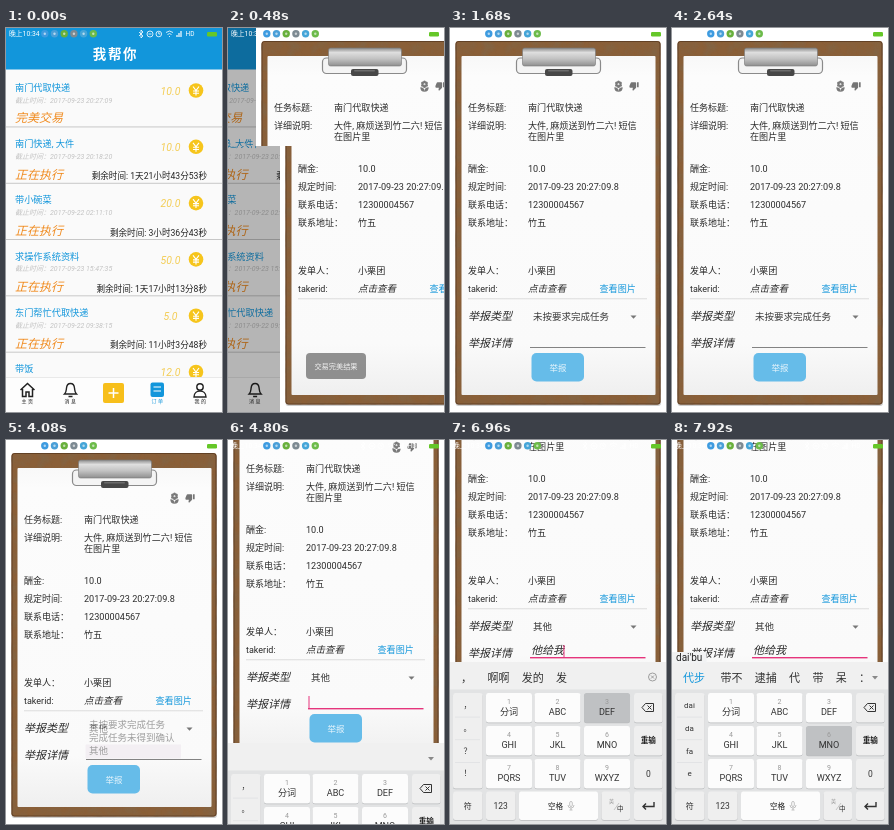
These frames come from a looping animation (216x384 px, 8000 ms). An HTML page:

```html
<!DOCTYPE html>
<html lang="zh-CN">
<head>
<meta charset="utf-8">
<style>
html, body { margin: 0; width: 100%; height: 100%; overflow: hidden; background: #fff; }
svg { display: block; width: 100%; height: 100%; }
text { font-family: Roboto, "Noto Sans CJK SC", "Noto Sans CJK", sans-serif; white-space: pre; }
.it { font-style: italic; }
.mid { text-anchor: middle; }
.end { text-anchor: end; }
</style>
</head>
<body>
<svg id="stage" viewBox="0 0 216 384" preserveAspectRatio="none"></svg>
<script>
const STEP = 240, LOOP = 8000, BLUE = '#1296db', INK = '#2b2b2b';
const PAN = 102, KB_TOP = 222, TEAR = 118;

// Markup helpers; text is placed by its vertical centre.
const text = (x, y, s, size = 9, fill = INK, cls = '', more = '') =>
  `<text x="${x}" y="${y + size * .36}" font-size="${size}" fill="${fill}" class="${cls}" ${more}>${s}</text>`;
const rect = (x, y, w, h, fill, r = 0, more = '') =>
  `<rect x="${x}" y="${y}" width="${w}" height="${h}" fill="${fill}" rx="${r}" ${more}/>`;
const path = (d, stroke, w = 1, fill = 'none', more = '') =>
  `<path d="${d}" stroke="${stroke}" stroke-width="${w}" fill="${fill}" ${more}/>`;
const dot = (x, y, r, fill, more = '') => `<circle cx="${x}" cy="${y}" r="${r}" fill="${fill}" ${more}/>`;
const group = (id, body, more = '') => `<g id="${id}" ${more}>${body}</g>`;

const defs = () => `
  <linearGradient id="paper" x1="0" y1="0" x2="0" y2="1">
    <stop offset="0" stop-color="#f8f8f8"/><stop offset=".06" stop-color="#fcfcfc"/>
    <stop offset=".85" stop-color="#fafafa"/><stop offset="1" stop-color="#efefef"/>
  </linearGradient>
  <linearGradient id="metal" x1="0" y1="0" x2="0" y2="1">
    <stop offset="0" stop-color="#8c8c8c"/><stop offset=".25" stop-color="#dedede"/>
    <stop offset=".6" stop-color="#c2c2c2"/><stop offset="1" stop-color="#8f8f8f"/>
  </linearGradient>
  <filter id="grain" x="0" y="0" width="1" height="1">
    <feTurbulence type="fractalNoise" baseFrequency=".09" numOctaves="3" seed="4"/>
    <feColorMatrix values="0 0 0 0 .22  0 0 0 0 .13  0 0 0 0 .06  1.8 0 0 0 -.65"/>
    <feComposite in2="SourceGraphic" operator="in" result="spots"/>
    <feMerge><feMergeNode in="SourceGraphic"/><feMergeNode in="spots"/></feMerge>
  </filter>
  <clipPath id="upper"><rect width="216" height="${TEAR}"/></clipPath>
  <clipPath id="lower"><rect y="${TEAR}" width="216" height="${384 - TEAR}"/></clipPath>`;

const orders = [
  ['南门代取快递', '10.0', '23 20:27:09', ''],
  ['南门快递, 大件', '10.0', '23 20:18:20', '1天21小时43分53秒'],
  ['带小碗菜', '20.0', '22 02:11:10', '3小时36分43秒'],
  ['求操作系统资料', '50.0', '23 15:47:35', '1天17小时13分8秒'],
  ['东门帮忙代取快递', '5.0', '22 09:38:15', '11小时3分48秒'],
  ['带饭', '12.0', '22 11:20:00', '10小时8分5秒'],
];

function order([title, price, time, left], i) {
  const y = 42.5 + i * 56.3;
  return text(9, y + 17, title, 9.2, BLUE)
    + text(9, y + 29.5, '截止时间：2017-09-' + time, 7, '#c3c3c3', 'it')
    + text(9, y + 47.5, left ? '正在执行' : '完美交易', 12, '#f08a1d', 'it')
    + (left && text(201, y + 49.5, '剩余时间: ' + left, 8.6, '#222', 'end'))
    + text(164.5, y + 20.5, price, 10.5, '#f3cd55', 'it mid')
    + dot(190, y + 20, 7.3, '#f6c51c')
    + path(`M187 ${y + 16}l3 4l3-4M190 ${y + 20}v5M187 ${y + 20.5}h6M187 ${y + 22.7}h6`, '#fff', 1.1)
    + rect(0, y + 56, 216, .9, '#c2c2c2');
}

function navBar() {
  const label = (x, s, c) => text(x, 373.5, s, 5, c, 'mid', 'letter-spacing="1.5"');
  return rect(0, 349, 216, 35, '#fdfdfd') + rect(0, 349, 216, .6, '#ddd')
    + path('M14.5 362l7-6.5l7 6.5M16.5 361v7.5h3.5v-4.5h3v4.5h3.5v-7.5', '#222', 1.5)
    + path('M58.5 366c2-2 1.7-4 2-6c.5-6 7.5-6 8 0c.3 2 0 4 2 6zM62.5 368.5h4', '#222', 1.4)
    + rect(97, 355, 21, 20, '#f7bf1b', 2) + path('M107.5 360v10M102.5 365h10', '#fff', 1.5)
    + rect(144.5, 354.5, 13.5, 14.5, BLUE, 2) + path('M147.5 359h7.5M147.5 363h7.5', '#fff', 1.2)
    + path('M188 369c0-8 12-8 12 0z', '#222', 1.4) + dot(194, 359, 3.2, '#fff', 'stroke="#222" stroke-width="1.4"')
    + label(22, '主页', '#222') + label(65, '消息', '#222') + label(152, '订单', BLUE) + label(195, '我的', '#222');
}

const listPage = () => rect(0, 0, 216, 384, '#fafafa')
  + rect(0, 42, 216, 56, '#dcdcdc', 0, 'id="pressed"')
  + orders.map(order).join('')
  + rect(0, 0, 216, 41.5, BLUE)
  + text(109.5, 26.5, '我帮你', 13.5, '#fff', 'mid', 'font-weight="700" letter-spacing="1.6"')
  + navBar();

const clipboard = () => rect(0, 0, 216, 384, '#fff')
  + rect(5.5, 14, 205.5, 364, '#000', 3, 'opacity=".2"')
  + rect(5.5, 13, 205, 363.5, '#8a5f39', 3, 'filter="url(#grain)"')
  + rect(6, 13.5, 204, 362.5, 'none', 2.5, 'stroke="#4a2d18" opacity=".6"')
  + rect(11.5, 28, 194, 339, 'url(#paper)', 1)
  + rect(66.5, 30, 84, 15.5, '#f4f4f4', 4, 'stroke="#8a8a8a" stroke-width="1.2"')
  + rect(72.5, 20, 73, 18, 'url(#metal)', 2, 'stroke="#777" stroke-width=".6"')
  + rect(95, 41, 27.5, 7, '#474747', 2) + rect(98, 42, 21, 1.5, '#6c6c6c', .7);

const thumbDown = 'M15 3H6c-.8 0-1.5.5-1.8 1.2l-3 7c-.1.3-.2.5-.2.8v2c0 1.1.9 2 2 2h6.3l-1 4.6c0 .5.1 1 .4 1.4L9.8 23l6.6-6.6c.4-.4.6-.9.6-1.4V5c0-1.1-.9-2-2-2zm4 0v12h4V3z';

function icons() {
  const petals = [0, 1, 2, 3, 4, 5].map(i => dot(168.5 + 2.2 * Math.sin(i * 1.047), 56.2 - 2.2 * Math.cos(i * 1.047), 1.5, '#7a7a7a'));
  return petals.join('') + dot(168.5, 56.2, .9, '#ddd')
    + path('M164.3 59.2q4.2 0 4.2 4q0-4 4.2-4q0 4.6-4.2 4.6q-4.2 0-4.2-4.6z', 'none', 0, '#7a7a7a')
    + path(thumbDown, 'none', 0, '#757575', 'transform="translate(179 53) scale(.42)"');
}

const details = [
  [80, '任务标题:', '南门代取快递'], [98, '详细说明:', '大件, 麻烦送到竹二六! 短信'], [109, '', '在图片里'],
  [140.5, '酬金:', '10.0'], [158.5, '规定时间:', '2017-09-23 20:27:09.8'], [176.5, '联系电话：', '12300004567'],
  [194.5, '联系地址：', '竹五'], [242.5, '发单人：', '小栗团'],
];
const choices = ['未按要求完成任务', '完成任务未得到确认', '其他'];

const form = () => text(18, 288.5, '举报类型', 11, INK, 'it') + text(18, 315, '举报详情', 11, INK, 'it')
  + text(83, 289, '', 9.5, '#3a3a3a', '', 'id="choice"')
  + path('M180.5 287.5h6l-3 3.2z', 'none', 0, '#777')
  + rect(80, 319, 115.5, .9, '#777', 0, 'id="line"')
  + text(81, 312, '', 11, INK, 'it', 'id="typed"')
  + rect(81, 307, 1, 12, '#e5357c', 0, 'id="caret"')
  + rect(81.5, 325, 52.5, 28.5, '#66bce9', 5) + text(108, 339.5, '举报', 8.5, '#e8f5fc', 'mid');

const popup = () => rect(79.5, 278, 95.5, 40.5, '#fafafa', 1)
  + rect(79.5, 304.5, 95.5, 14, '#e8dfe8', 0, 'id="chosen"')
  + choices.map((s, i) => text(83, 285 + i * 13, s, 9.5, '#444')).join('');

const boardPage = () => clipboard() + icons()
  + details.map(([y, k, v]) => text(18, y, k) + text(78, y, v, 9.1)).join('')
  + text(18, 260.5, 'takerid:') + text(78, 260.5, '点击查看', 9.5, INK, 'it') + text(149.5, 261, '查看图片', 9.1, BLUE)
  + rect(18, 270.5, 179, .7, '#cfcfcf')
  + group('form', form()) + group('popup', popup());

function statusBar() {
  const white = (d, w = .8) => path(d, '#fff', w);
  const apps = ['#3d9be0', '#4a9fd8', '#68b03c', '#7d8a92', '#45a5d8', '#6cbb4a'];
  return text(3, 5.8, '晚上10:34', 6.8, '#fff')
    + apps.map((c, i) => dot(38.8 + i * 9.7, 5.8, 3.7, c) + dot(38.8 + i * 9.7, 5.8, 1.2, '#fff', 'opacity=".6"')).join('')
    + white('M133 4l4 4l-2 2v-8l2 2l-4 4') + white('M141 6a3 3 0 1 0 6 0a3 3 0 1 0-6 0M142.5 6h3')
    + white('M150 6a2.8 2.8 0 1 0 5.6 0a2.8 2.8 0 1 0-5.6 0M152.8 4v2h1.5')
    + white('M160 4.5q3.5-3 7 0M161.5 6.5q2-1.8 4 0M163 8.5h1') + white('M171 9v-2M173 9v-4M175 9v-6', 1.2)
    + text(179.5, 6, 'HD', 6.5, '#fff')
    + rect(201, 4, 10, 4.5, '#65c728', 1.2);
}

const keyNames = ['分词', 'ABC', 'DEF', 'GHI', 'JKL', 'MNO', 'PQRS', 'TUV', 'WXYZ'];
const colX = [36, 84.5, 134], rowY = [253, 286, 319];

const keyFace = (x, y, w, h, fill = '#fcfcfc', more = '') =>
  rect(x, y + .8, w, h, '#b9bbbd', 2.5) + rect(x, y, w, h, fill, 2.5, more);

function keyboard() {
  const keys = keyNames.map((s, i) => {
    const x = colX[i % 3], y = rowY[i / 3 | 0];
    return keyFace(x, y, 46, 29.5, '#fcfcfc', `id="key${i + 1}"`)
      + text(x + 23, y + 8, i + 1, 7, '#999', 'mid') + text(x + 23, y + 18.5, s, 9.1, '#333', 'mid');
  }).join('');
  const side = '#efefef';
  return rect(0, KB_TOP, 216, 162, '#e2e3e4') + rect(0, KB_TOP, 216, 27.5, '#f0f0f0')
    + group('words', '') + keyFace(3, 253, 29.5, 95.5, side) + group('sounds', '') + keys
    + rowY.map(y => keyFace(184, y, 28.5, 29.5, side)).join('')
    + path('M192 267.5l3.5-4h8v8h-8zM197.5 265.5l4 4M201.5 265.5l-4 4', '#333', 1)
    + text(198.3, 300.5, '重输', 7.6, '#222', 'mid', 'font-weight="700"') + text(198.3, 333.5, '0', 8.5, '#333', 'mid')
    + keyFace(3, 351.5, 29.5, 28.5, side) + text(17.7, 366, '符', 8, '#333', 'mid')
    + keyFace(36, 351.5, 29.5, 28.5, side) + text(50.7, 366, '123', 8.5, '#333', 'mid')
    + keyFace(69, 351.5, 79, 28.5) + text(98, 366, '空格', 7.6, '#222', '', 'font-weight="500"')
    + rect(119.7, 361.5, 2.6, 5, 'none', 1.3, 'stroke="#aaa" stroke-width=".7"')
    + path('M118 365q0 3 3 3t3-3M121 368v2M119.5 370h3', '#aaa', .7)
    + keyFace(151.5, 351.5, 28.5, 28.5, side) + text(159, 361.5, '英', 5, '#999')
    + path('M164 370l5-7', '#aaa', .6) + text(167, 368.5, '中', 6.5, '#222')
    + keyFace(184, 351.5, 28.5, 28.5, side) + path('M204 362v4.5h-11M196 363.5l-3 3l3 3', '#333', 1.4)
    + group('compose', '');
}

// [step, pressed key, composing, candidates, side column, committed text]
const MARKS = '， 。 ？ ！';
const typing = [
  [0, 0, '', '', MARKS, ''],
  [22, 8, '', '', MARKS, ''],
  [23, 2, 't', '他 她 它 图 题 提 替', 't u v 8', ''],
  [24, 4, 'ta', '他 她 它 塔 踏 塌 UC TI', 'ta u v t', ''],
  [25, 3, "ta'g", '他个 他 她 它 塔 踏', 'ta u v t', ''],
  [26, 9, "ta'gei", '他给 她给 它给 他 她', 'ta u v t', ''],
  [27, 6, "ta'gei'wo", '他给我 她给我 他给 他', 'ta u v t', ''],
  [28, 0, '', '， 啊啊 发的 发', MARKS, '他给我'],
  [29, 3, '', '， 啊啊 发的 发', MARKS, '他给我'],
  [30, 4, 'da', '大 打 法 发 达 答 搭', 'da fa d e', '他给我'],
  [31, 2, 'dai', '代 带 呆 待 袋 戴', 'dai da fa e', '他给我'],
  [32, 8, "dai'b", '代表 带 代 呆 待 袋', 'dai da fa e', '他给我'],
  [33, 6, "dai'bu", '代步 带不 逮捕 代 带 呆 ：', 'dai da fa e', '他给我'],
];

const latin = s => /^[A-Z]/.test(s);
function candidates(words, composing) {
  let x = 11;
  const row = words.split(' ').map((s, i) => {
    const out = text(x, 238, s, 11, i || !composing ? '#333' : BLUE);
    x += s.length * (latin(s) ? 7.2 : 11) + (i ? 12.3 : 15.5);
    return out;
  }).join('');
  const mark = words && !composing
    ? path('M198.5 237a4 4 0 1 0 8 0a4 4 0 1 0-8 0M201 235.5l3 3M204 235.5l-3 3', '#888', .8)
    : path('M200 236h6l-3 3.5z', 'none', 0, '#888');
  return row + mark;
}

const stage = document.getElementById('stage');
const band = (name, clip) => group(name, `<use id="${name}List" href="#list"/>`
  + rect(0, 0, 216, 384, '#000', 0, `id="${name}Dim"`)
  + `<use id="${name}Board" href="#board"/>`, `clip-path="url(#${clip})"`);
stage.innerHTML = `<defs>${defs()}${group('list', listPage())}${group('board', boardPage())}</defs>`
  + band('top', 'upper') + band('bottom', 'lower') + statusBar()
  + group('toast', rect(78, 325, 60, 26, '#858585', 4) + text(108, 338.5, '交易完美结果', 7.2, '#f2f2f2', 'mid'))
  + group('keyboard', keyboard());

const el = id => document.getElementById(id);
const set = (id, attrs) => { for (const k in attrs) el(id).setAttribute(k, attrs[k]); };
const show = (id, opacity) => set(id, { opacity: +opacity, visibility: opacity ? 'visible' : 'hidden' });

// The list trails the incoming page at a fraction of its speed.
function slide(name, x, pan) {
  set(name + 'List', { transform: `translate(${(x - 216) * .228} 0)` });
  set(name + 'Board', { transform: `translate(${x} ${-pan})` });
  show(name + 'Dim', x < 216 ? .28 : 0);
}

function render(step) {
  const lift = step < 20 ? 0 : step === 20 ? .5 : 1;
  slide('top', step < 2 ? 216 : step === 2 ? 28 : 0, PAN * lift);
  slide('bottom', step < 2 ? 216 : step === 2 ? 52 : 0, PAN * lift);
  show('pressed', step === 1 ? .5 : 0);
  show('toast', { 2: .9, 3: 1, 4: 1, 5: .5 }[step] || 0);

  show('form', step >= 6);
  show('popup', { 13: .6, 14: 1, 15: 1, 16: 1, 17: .5 }[step] || 0);
  show('chosen', step === 16 || step === 17 ? .7 : 0);
  el('choice').textContent = choices[step < 17 ? 0 : 2];

  const [, key, composing, words, sounds, typed] = typing.filter(row => row[0] <= step).pop();
  const focus = step >= 19;
  set('line', { fill: focus ? '#e5357c' : '#777', height: focus ? 1.4 : .9 });
  el('typed').textContent = typed;
  set('caret', { x: 80.5 + typed.length * 11 });
  show('caret', focus && step < 30);

  show('keyboard', lift > 0);
  set('keyboard', { transform: `translate(0 ${(1 - lift) * 162})` });
  keyNames.forEach((_, i) => set('key' + (i + 1), { fill: key === i + 1 ? '#bfc1c3' : '#fcfcfc' }));
  el('words').innerHTML = candidates(words, composing);
  el('sounds').innerHTML = sounds.split(' ').map((s, i) =>
    text(17.5, 265.5 + i * 22.6, s, 8, '#333', 'mid') + (i ? rect(5, 254 + i * 22.8, 25, .5, '#d4d7da') : '')).join('');
  el('compose').innerHTML = composing
    ? rect(0, 212, 7 + composing.length * 4.6, 11.5, '#f1f2f3') + text(4, 217.5, composing, 10, '#222') : '';
}

let shown = -1;
function tick(now) {
  const step = Math.floor(now % LOOP / STEP);
  if (step !== shown) render(shown = step);
  requestAnimationFrame(tick);
}
render(0);
requestAnimationFrame(tick);
</script>
</body>
</html>
```
